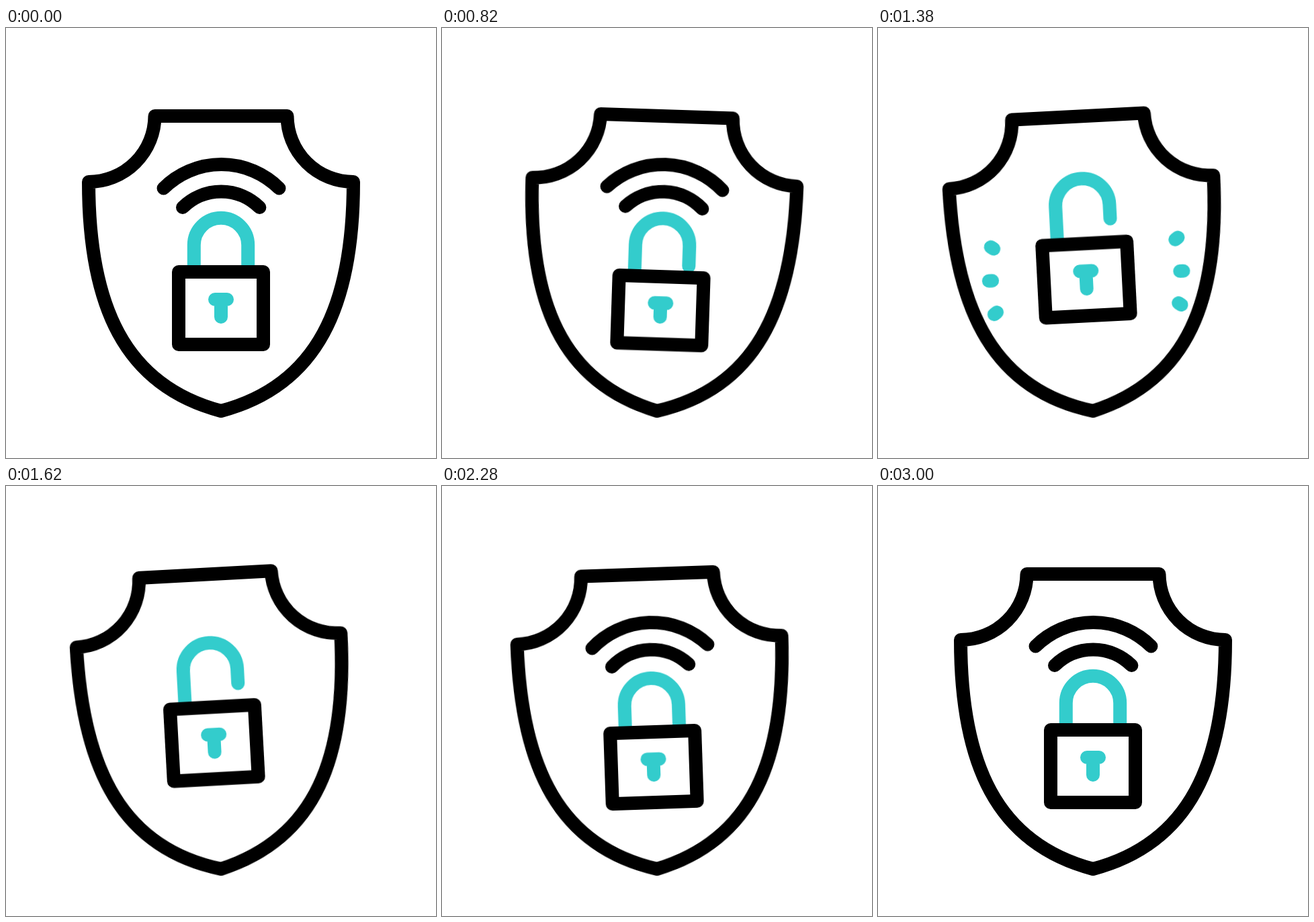
Recreate the animation shown at these times as an HTML page without scripts. Size 640 px wide and 640 px high, loop 3.2 s.

```html
<!DOCTYPE html>
<html lang="en">
<head>
<meta charset="utf-8">
<title>Shield and lock</title>
<style>
html, body { margin: 0; height: 100%; overflow: hidden; background: #fff; }
svg { display: block; width: 100vw; height: 100vh; }
svg * {
  fill: none;
  stroke: #000;
  stroke-width: 20;
  stroke-linecap: round;
  stroke-linejoin: round;
  animation: 3200ms cubic-bezier(.333, 0, .667, 1) infinite;
}
.teal, .teal * { stroke: #33cccc; }
.badge { transform-origin: 320px 570px; animation-name: sway; }
.wave { animation-name: wave; stroke-dasharray: 100 200; }
.outer { animation-delay: 80ms; }
.shackle { animation-name: shackle; }
.body { fill: #fff; animation-name: body; }
.keyhole { animation-name: keyhole; }
.spark path { animation-name: spark; opacity: 0; }

@keyframes sway {
  0%, 6.25% { transform: rotate(0deg); }
  28.75% { transform: rotate(2deg); }
  48.44% { transform: rotate(-4deg); }
  59.06% { transform: rotate(4deg); }
  70% { transform: rotate(-2deg); }
  85% { transform: rotate(2deg); }
  93.75%, 100% { transform: rotate(0deg); }
}
/* each wave closes towards its middle, then opens again */
@keyframes wave {
  0%, 28.75% { stroke-dasharray: 100 200; stroke-dashoffset: 0; opacity: 1; }
  33.74% { opacity: 1; }
  33.75%, 61.25% { stroke-dasharray: 0 200; stroke-dashoffset: -50; opacity: 0; }
  61.26% { opacity: 1; }
  66.25%, 100% { stroke-dasharray: 100 200; stroke-dashoffset: 0; opacity: 1; }
}
@keyframes body {
  0%, 6.25% { y: 363px; height: 108px; }
  28.75% { y: 370.4px; height: 100px; }
  43.125%, 48.44% { y: 320.4px; height: 107.6px; }
  58.125% { y: 383px; height: 103px; }
  71.25% { y: 366px; height: 105px; }
  75.6%, 100% { y: 363px; height: 108px; }
}
@keyframes shackle {
  0%, 6.25% { d: path("M279.8 370V323A40.2 40.2 0 0 1 360.2 323V353"); }
  28.75% { d: path("M279.8 372V323.4A40.2 40.2 0 0 1 360.2 323.4V353"); }
  43.125%, 48.44% { d: path("M279.8 325V264A40.2 40.2 0 0 1 360.2 264V285.4"); }
  58.125% { d: path("M279.8 385V333.5A40.2 40.2 0 0 1 360.2 333.5V361"); }
  71.25% { d: path("M279.8 372V326.3A40.2 40.2 0 0 1 360.2 326.3V357"); }
  75.6%, 100% { d: path("M279.8 370V323A40.2 40.2 0 0 1 360.2 323V353"); }
}
@keyframes keyhole {
  0%, 6.25% { d: path("M311 404H329M320 404V430"); }
  28.75% { d: path("M311 409.6H329M320 409.6V430"); }
  43.125%, 48.44% { d: path("M311 361.5H329M320 361.5V388"); }
  58.125% { d: path("M311 423.2H329M320 423.2V445.8"); }
  71.25% { d: path("M311 406.4H329M320 406.4V430"); }
  75.6%, 100% { d: path("M311 404H329M320 404V430"); }
}
@keyframes spark {
  0%, 36.87% { stroke-dasharray: 0 60; stroke-dashoffset: 0; opacity: 0; }
  36.88% { stroke-dasharray: 0 60; stroke-dashoffset: 0; opacity: 1; }
  40.31% {
    stroke-dasharray: 30 60; stroke-dashoffset: 0; opacity: 1;
    animation-timing-function: linear;
  }
  43.75% { stroke-dasharray: 0 60; stroke-dashoffset: -30; opacity: 1; }
  43.76%, 100% { stroke-dasharray: 0 60; stroke-dashoffset: -30; opacity: 0; }
}
</style>
</head>
<body>
<svg viewBox="0 0 640 640">
  <g class="badge">
    <path d="M221.5 131H418.5A98.5 98.5 0 0 0 517 229C517 413 464 532 320 570C176 532 123 413 123 229A98.5 98.5 0 0 0 221.5 131Z"/>
    <path class="wave outer" pathLength="100" d="M234.5 238.5A122 122 0 0 1 406.5 238.5"/>
    <path class="wave" pathLength="100" d="M263 267A81.4 81.4 0 0 1 377.4 267"/>
    <g class="teal spark">
      <path pathLength="30" d="M435 335.5l24.5 -17"/>
      <path pathLength="30" d="M435 368.7h30"/>
      <path pathLength="30" d="M435 402l24.5 17"/>
      <path pathLength="30" d="M205 335.5l-24.5 -17"/>
      <path pathLength="30" d="M205 368.7h-30"/>
      <path pathLength="30" d="M205 402l-24.5 17"/>
    </g>
    <path class="teal shackle" d="M279.8 370V323A40.2 40.2 0 0 1 360.2 323V353"/>
    <rect class="body" x="257" y="363" width="126" height="108"/>
    <path class="teal keyhole" d="M311 404H329M320 404V430"/>
  </g>
</svg>
</body>
</html>
```
